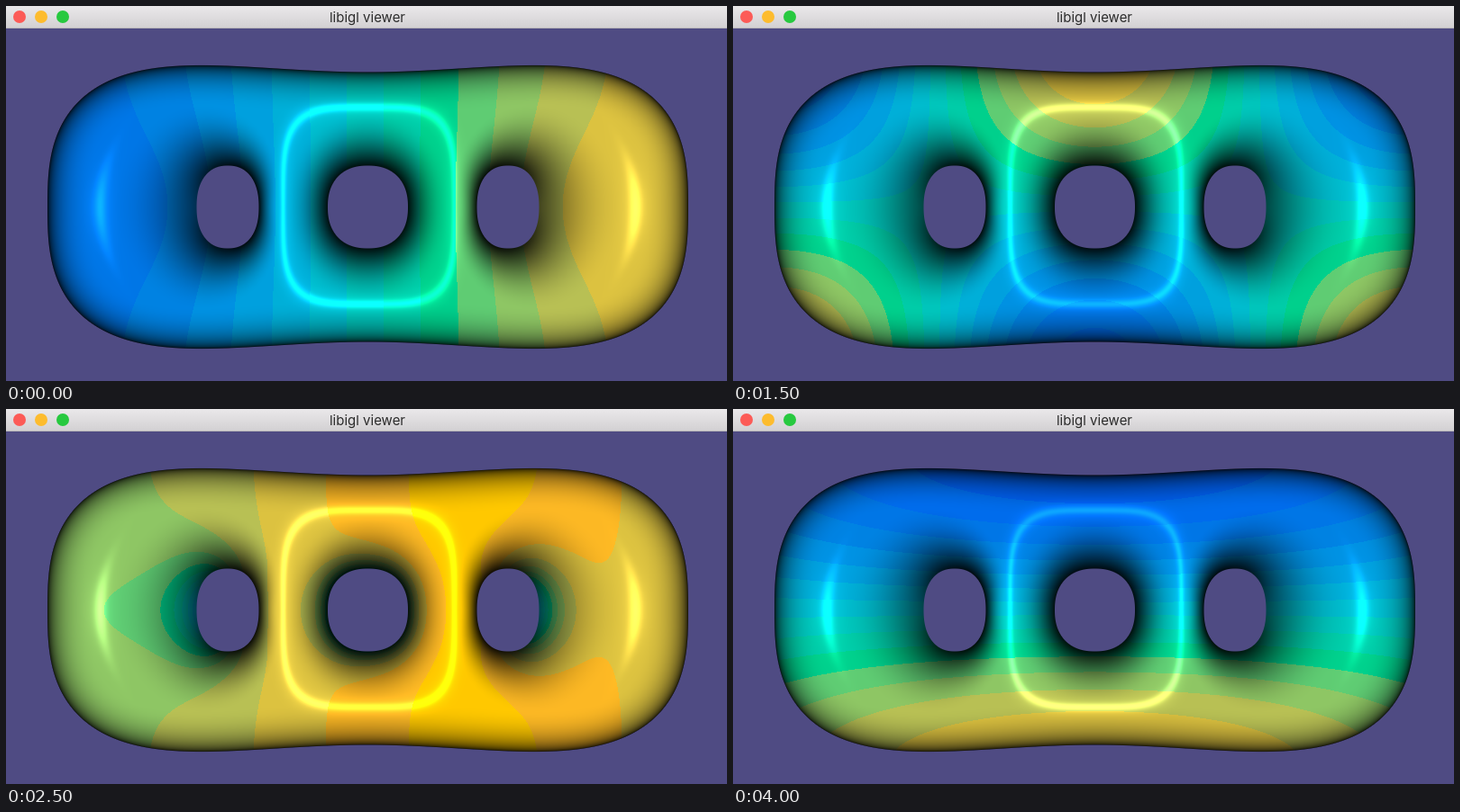
Recreate the animation shown at these times as an HTML page with a canvas. Size 800 by 417 pixels, loop 4500 ms.

```html
<!DOCTYPE html>
<html lang="en">
<head>
<meta charset="utf-8">
<title>libigl viewer</title>
<style>
  html, body { margin: 0; width: 100%; height: 100%; overflow: hidden; background: #4f4b83; }
  header {
    position: absolute; left: 0; top: 0; width: 800px; height: 24px;
    background: linear-gradient(#eae8ea, #d3d1d3); border-bottom: 1px solid #b9b7b9;
    font: 15px/25px Inter, sans-serif; color: #2b2b2b; text-align: center;
  }
  header span { position: relative; left: 1px; }
  header i { position: absolute; top: 5px; width: 14px; height: 14px; border-radius: 50%; }
  canvas { position: absolute; left: 0; top: 25px; }
</style>
</head>
<body>
<header>
  <i style="left:8px;background:#fc5b57"></i>
  <i style="left:32px;background:#fdbc2e"></i>
  <i style="left:56px;background:#27c93f"></i>
  <span>libigl viewer</span>
</header>
<canvas width="800" height="392"></canvas>
<script>
const WIDTH = 800, HEIGHT = 392, TOP = 25, STEP = 500;
const CX = 401.5, CY = 223.5;
const HOLES = [-155.5, 0, 155.5];
const BACKGROUND = [79, 75, 131];
const PALETTE = [
  '#3e2eb4', '#3a31c8', '#0f48eb', '#005fee', '#006cec', '#0076e6', '#0082e2',
  '#0091e2', '#00a0de', '#00afd8', '#00bcce', '#00c6bc', '#00cca8', '#00d08c',
  '#5fcc73', '#8ec664', '#b8c054', '#dcc240', '#fcb824', '#ffc800'
].map(hex => [1, 3, 5].map(k => parseInt(hex.slice(k, k + 2), 16)));

const { abs, exp, sin, cos, tanh, hypot, min, max, PI } = Math;
const clamp = (v, lo, hi) => min(hi, max(lo, v));
const bell = (v, width) => exp(-((v / width) ** 2));
const superNorm = (x, y, n) => (abs(x) ** n + abs(y) ** n) ** (1 / n);

// Distance from the outer silhouette, positive inside.
function outline(dx, dy) {
  const x = dx / 355.5;
  return 1 - superNorm(x, dy / (150 + 72 * x * x - 24 * x ** 4), 2.8);
}
function rimDistance(dx, dy) {
  const f = outline(dx, dy);
  return f / max(1e-3, hypot(outline(dx + 1, dy) - f, outline(dx, dy + 1) - f));
}

// Distance from a hole's edge; side is 1 towards the middle of the shape.
function hole(dx, dy, offset) {
  const hx = dx - offset, r = hypot(hx, dy) || 1;
  const norm = superNorm(hx / (offset ? 34.5 : 44.5), dy / 46, 2.3) || 0.01;
  return { d: r - r / norm, side: -Math.sign(offset) * hx / r };
}
function holePull(dx, dy, offset, strength, reach) {
  const { d, side } = hole(dx, dy, offset);
  return strength * exp(-max(0, d) / reach) * ((1 - side) / 2) ** 2;
}

// Value of each eigenfunction, in palette steps.
const modes = [
  (dx, dy) => {
    const stretch = 1 + 0.25 * bell(abs(dx) - 220, 90) * bell(dy, 103);
    return 11.5 + 6.2 * sin(clamp((dx + 3) * stretch / 251, -1.5, 1.5));
  },
  () => 16.2,
  (dx, dy) => 10.7 + 7.9 * sin(clamp(dx / 215, -1.5, 1.5))
    + bell(dy, 103) * (1.6 * bell(dx - 290, 50) - 1.6 * bell(dx + 320, 60) - 0.25 * bell(dx - 95, 60))
    + holePull(dx, dy, -155.5, 12, 27) - holePull(dx, dy, 155.5, 12, 27),
  (dx, dy) => 11.3 - 7 * sin(dy / 120) * cos(dx / 113),
  (dx, dy) => 10.5
    + 8.5 * bell(hypot(dx - 164, (dy + 4) * 0.74), 115)
    - 6.5 * bell(hypot(dx + 124, dy * 0.727), 105)
    + 6.5 * exp(-(dx + 355) / 50) - 4.5 * exp((dx - 355) / 45),
  (dx, dy) => 15.5 + 3.8 * bell(dx - 118, 255)
    - 0.8 * bell(dy, 70) * bell(dx + 250, 110)
    - holePull(dx, dy, -155.5, 7, 24) - holePull(dx, dy, 155.5, 9, 24)
    - 5 * exp(-max(0, hole(dx, dy, 0).d) / 14),
  (dx, dy) => {
    const s = 11 * tanh(dx / 160) * sin(dy / 150);
    return 11.6 + s - 0.03 * s * s + 1.2 * bell(dx, 120) * (dy / 150) ** 2;
  },
  (dx, dy) => 11.3 - 6 * cos(dx / 113),
  (dx, dy) => 10.6 + 7.5 * sin(dy / 110) * (1 - 0.35 * (dx / 355) ** 2)
];

function highlight(dx, dy) {
  const ring = (superNorm((dx - 1) / 95, (dy + 1.5) / 109.5, 4) - 1) * 100;
  const ringWidth = 2.6 + 1.2 * min(1, abs(dy) / 110);
  const crescent = abs(dx) - 297 + dy * dy / 300;
  const fade = bell(dy, 45);
  return min(1, 0.65 * bell(ring, ringWidth) + 0.2 * bell(ring, 9)
    + fade * (0.65 * bell(crescent, 6) + 0.2 * bell(crescent, 14)));
}

function light(dx, dy) {
  const rim = rimDistance(dx, dy);
  if (rim < -0.5) return null;
  let edge = rim;
  let shade = (1 - (1 - clamp(rim / 50, 0, 1)) ** 2) ** 0.5;
  for (const offset of HOLES) {
    const { d, side } = hole(dx, dy, offset);
    if (d < -0.5) return null;
    const reach = offset ? 65 - 36.5 * side - 6.5 * side * side
                         : 48 + 16 * (abs(dy) / hypot(dx, dy)) ** 2;
    const floor = offset ? 0.06 + 0.3 * ((1 - side) / 2) ** 3 : 0.08;
    edge = min(edge, d);
    shade *= floor + (1 - floor) * sin(PI / 2 * clamp(d / reach, 0, 1));
  }
  return { cover: clamp(edge + 0.5, 0, 1), shade, shine: highlight(dx, dy) };
}

const surface = [];
for (let row = 0; row < HEIGHT; row++) {
  for (let col = 0; col < WIDTH; col++) {
    const dx = col + 0.5 - CX, dy = row + TOP + 0.5 - CY;
    const lit = light(dx, dy);
    if (lit) surface.push({ at: 4 * (row * WIDTH + col), dx, dy, ...lit });
  }
}

const ctx = document.querySelector('canvas').getContext('2d');
const rendered = [];

function render(mode) {
  const image = ctx.createImageData(WIDTH, HEIGHT);
  for (const { at, dx, dy, cover, shade, shine } of surface) {
    const level = clamp(Math.floor(mode(dx, dy)), 0, PALETTE.length - 1);
    for (let k = 0; k < 3; k++) {
      const lit = min(255, PALETTE[level][k] * (shade + 0.5 * shine) + 15 * shine);
      image.data[at + k] = BACKGROUND[k] + (lit - BACKGROUND[k]) * cover;
    }
    image.data[at + 3] = 255;
  }
  return image;
}

let shown = -1;
function tick() {
  const index = Math.floor(performance.now() / STEP) % modes.length;
  if (index !== shown) {
    rendered[index] ||= render(modes[index]);
    ctx.putImageData(rendered[index], 0, 0);
    shown = index;
  }
  requestAnimationFrame(tick);
}
tick();
</script>
</body>
</html>
```
